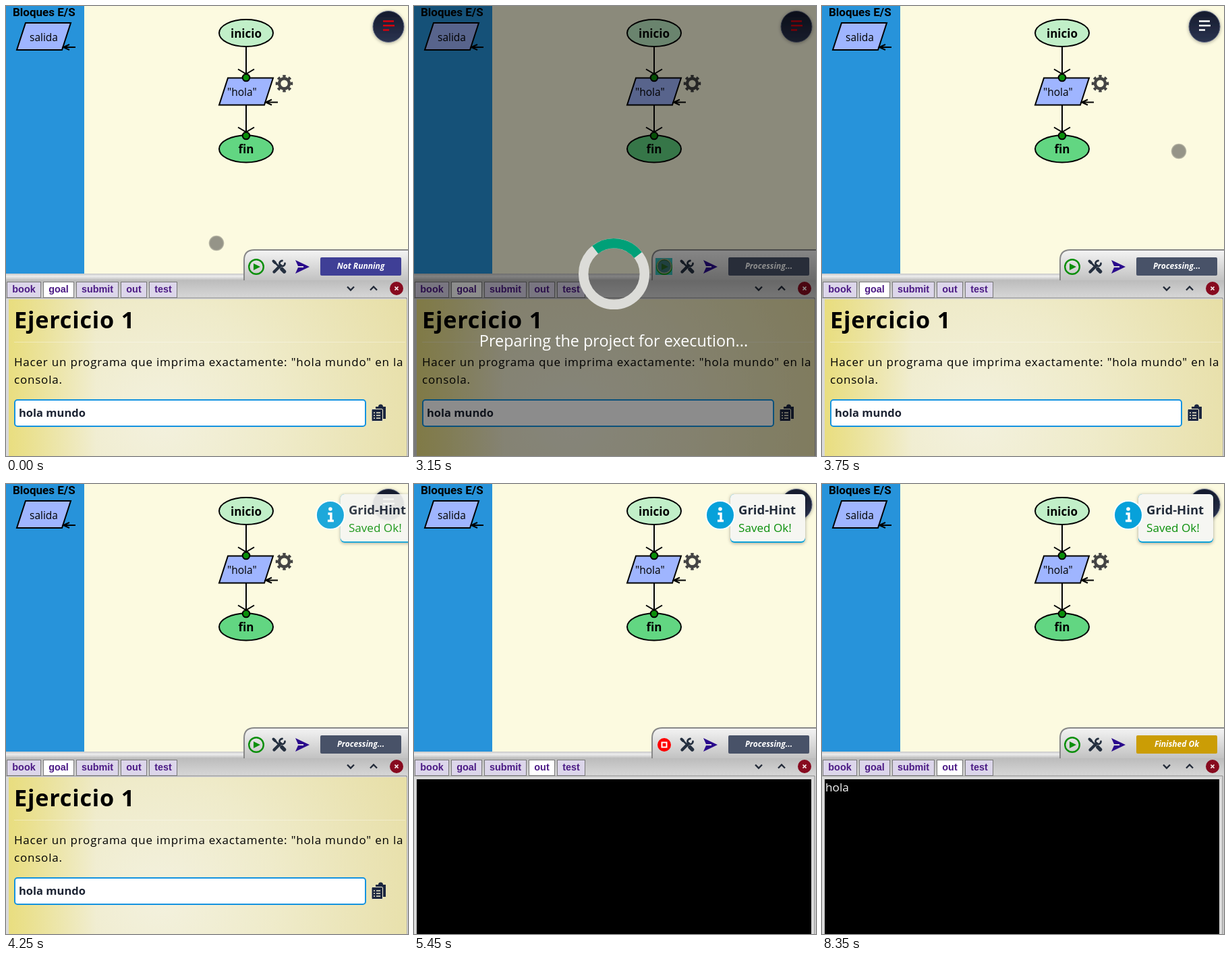
An HTML page for the animation above (9.6 s loop, 596 by 666 pixels).

```html
<!DOCTYPE html>
<html lang="es">
<head>
<meta charset="utf-8">
<style>
  html, body { margin: 0; width: 100%; height: 100%; overflow: hidden; }
  svg { display: block; width: 100vw; height: 100vh; font-family: "Open Sans", "Noto Sans", sans-serif; }
  .b { font-weight: bold; }
  .mid { text-anchor: middle; }
  .ink { fill: none; stroke: #000; stroke-width: 2; }
  .tab rect { fill: #dcd6ea; stroke: #777; }
  .tab text { font: bold 14.4px "Liberation Sans", Arial, sans-serif; fill: #4b1a85; }
  .tab.on rect { fill: #fff; }
</style>
</head>
<body>
<svg viewBox="0 0 596 666">
  <defs>
    <linearGradient id="panel" x2="0" y2="1"><stop stop-color="#f4f4f4"/><stop offset="1" stop-color="#c2c2c2"/></linearGradient>
    <linearGradient id="bar" x2="0" y2="1"><stop stop-color="#bcbcbc"/><stop offset="1" stop-color="#d8d8d8"/></linearGradient>
    <linearGradient id="split" x2="0" y2="1"><stop stop-color="#c8c8c8"/><stop offset=".4" stop-color="#eee"/><stop offset="1" stop-color="#bbb"/></linearGradient>
    <linearGradient id="navy" x2="0" y2="1"><stop stop-color="#151b2c"/><stop offset="1" stop-color="#2b3350"/></linearGradient>
    <radialGradient id="paper" gradientUnits="userSpaceOnUse" cx="230" cy="610" r="430">
      <stop stop-color="#f3f1de"/><stop offset=".4" stop-color="#efebca"/><stop offset="1" stop-color="#e6dda2"/>
    </radialGradient>
    <linearGradient id="glow"><stop stop-color="#e8dc74" stop-opacity=".85"/><stop offset="1" stop-color="#e8dc74" stop-opacity="0"/></linearGradient>
    <filter id="shade" x="-30%" y="-30%" width="160%" height="160%"><feDropShadow dx="0" dy="1" stdDeviation="2.5" flood-opacity=".35"/></filter>
    <g id="io">
      <path class="ink" style="fill:#9fb5ff" d="M13 0H80L67 40H0Z"/>
      <path class="ink" d="M87 36H70M78 32L69 36L78 40"/>
    </g>
    <g id="link">
      <path class="ink" d="M0 0V41M-12 33L0 40L12 33"/>
      <circle class="ink" cy="45.500" r="5.300" style="fill:#0a8f0a"/>
    </g>
  </defs>

  <rect width="596" height="400" fill="#fcfae0"/>
  <rect width="116" height="397" fill="#2793da"/>
  <text class="b" x="10" y="15" style="font-family:Roboto,sans-serif;font-size:17px">Bloques E/S</text>
  <use href="#io" x="16" y="25"/>
  <text x="35" y="52" font-size="15.5">salida</text>

  <ellipse class="ink" cx="356" cy="40" rx="40" ry="20" style="fill:#c1efc8"/>
  <ellipse class="ink" cx="356" cy="211.500" rx="40" ry="20" style="fill:#62d682"/>
  <use href="#io" x="316" y="106.500"/>
  <use href="#link" x="356" y="60.500"/>
  <use href="#link" x="356" y="146.500"/>
  <g class="b mid" font-size="17"><text x="356" y="46.500">inicio</text><text x="356" y="218">fin</text></g>
  <text x="328" y="133" font-size="15.5">"hola"</text>
  <g transform="translate(412.500 114.800)" fill="none" stroke="#444">
    <circle r="7.500" stroke-width="4.500"/>
    <circle r="10.800" stroke-width="4" pathLength="16" stroke-dasharray="1" transform="rotate(-11.250)"/>
  </g>

  <g filter="url(#shade)"><circle cx="567" cy="30.500" r="23" fill="url(#navy)" stroke="#5c6580"/></g>
  <path id="menu" d="M559 22.500H575M559 29H576M559 35.500H568" stroke-width="2.400"/>

  <rect y="396" width="596" height="10" fill="url(#split)"/>
  <path d="M353 406V376Q353 361 368 361H600V406" fill="url(#panel)" stroke="#888" stroke-width="2"/>
  <rect id="focus" x="358" y="373" width="25" height="25" fill="#35b5b5"/>
  <g id="play">
    <circle cx="371" cy="386" r="10.800" fill="none" stroke="#0a8f0a" stroke-width="2.400"/>
    <path d="M367 381V391L377 386Z" fill="#0a8f0a"/>
  </g>
  <g id="stop">
    <circle cx="371" cy="386" r="10" fill="red"/>
    <rect x="367.500" y="382.500" width="7" height="7" fill="none" stroke="#fff" stroke-width="2"/>
  </g>
  <g fill="none" stroke="#253040" stroke-linecap="round">
    <path d="M396.500 377.500L406 387" stroke-width="2.600"/>
    <path d="M396.500 377.500L399 380" stroke-width="4"/>
    <path d="M409 389.500L412.500 393" stroke-width="5.500"/>
    <path d="M397.500 393.500L407 384" stroke-width="4.400"/>
    <path d="M413.500 381A4 4 0 1 1 409.500 377" stroke-width="2.800"/>
  </g>
  <path d="M429 376L450 386L429 396L433 387H441V385H433Z" fill="#2a0a8c"/>
  <rect id="badge" x="466" y="372" width="120" height="27" rx="2"/>
  <text id="status" class="b mid" x="526" y="389" font-size="12" font-style="italic" fill="#fff"></text>

  <rect y="406" width="596" height="27" fill="url(#bar)"/>
  <rect y="432" width="596" height="234" fill="#d9d9d9"/>
  <path d="M0 432H594V666" fill="none" stroke="#888"/>
  <g id="tabs"></g>
  <path d="M506 415.500L511 420.500L516 415.500M540 420.500L545 415.500L550 420.500" fill="none" stroke="#222a38" stroke-width="2.300"/>
  <circle cx="579" cy="418" r="10" fill="#870a1f"/>
  <path d="M576.500 415.500L581.500 420.500M581.500 415.500L576.500 420.500" stroke="#fff" stroke-width="1.600"/>

  <g id="goal">
    <rect x="4" y="434" width="590" height="232" fill="url(#paper)"/>
    <rect x="4" y="434" width="130" height="232" fill="url(#glow)"/>
    <text class="b" x="12" y="477" font-size="34.2" letter-spacing=".8">Ejercicio 1</text>
    <path d="M12 497.500H592" stroke="#fff" opacity=".35"/>
    <g font-size="17" letter-spacing=".8">
      <text x="12" y="533">Hacer un programa que imprima exactamente: "hola mundo" en la</text>
      <text x="12" y="558.500">consola.</text>
    </g>
    <rect x="13" y="583" width="520" height="39" rx="4" fill="#fff" stroke="#1493e0" stroke-width="2"/>
    <text class="b" x="19" y="608" font-size="16.5" fill="#1d2433">hola mundo</text>
    <g fill="#1d2740">
      <path d="M548 593H552A3.500 3.500 0 0 1 559 593H563V611H548Z"/>
      <rect x="542" y="596.500" width="16.500" height="18" rx="1.500" stroke="#f1edcf"/>
      <path d="M545 602H547M549 602H555M545 606H547M549 606H555M545 610H547M549 610H555" stroke="#f1edcf" stroke-width="1.500"/>
    </g>
  </g>
  <g id="out">
    <rect x="4" y="437" width="585" height="229"/>
    <text id="print" x="5" y="454.500" font-size="17.200" fill="#f4f4f4">hola</text>
  </g>

  <g id="toast">
    <g filter="url(#shade)">
      <rect x="469" y="15" width="111" height="72" rx="6" fill="#0aa2d8"/>
      <rect x="469" y="15" width="111" height="70" rx="6" fill="#f6f6f2"/>
    </g>
    <circle cx="454" cy="46" r="21" fill="#07a1da" stroke="#fff" stroke-width="2"/>
    <circle cx="454" cy="37" r="2.800" fill="#fff"/>
    <path d="M450.500 44H455V54M450 54.500H459" fill="none" stroke="#fff" stroke-width="3.500"/>
    <text class="b" x="481" y="45" font-size="18.500" fill="#222b3a">Grid-Hint</text>
    <text x="481" y="70.500" font-size="17.100" fill="#0a8f0a">Saved Ok!</text>
  </g>

  <circle id="cursor" r="10.500" stroke="#a9a899" stroke-opacity=".8" stroke-width="1.600" fill="#404040"/>

  <g id="wait">
    <rect width="596" height="666" opacity=".45"/>
    <g fill="none" stroke-width="14.500">
      <circle cx="296.500" cy="396.500" r="45.300" stroke="#dcdcd8"/>
      <path id="arc" d="M264.500 364.500A45.300 45.300 0 0 1 328.500 364.500" stroke="#00a078"/>
    </g>
    <text class="mid" x="296" y="504" font-size="23.400" fill="#fff">Preparing the project for execution...</text>
  </g>
</svg>
<script>
const LOOP = 9600, STEP = 50;
const $ = id => document.getElementById(id);
const show = (id, on) => $(id).style.display = on ? '' : 'none';
const set = (id, attrs) => { for (const k in attrs) $(id).setAttribute(k, attrs[k]); };

const tabs = [['book', 1, 51], ['goal', 55, 46], ['submit', 104, 63], ['out', 170, 39], ['test', 212, 42]];
$('tabs').innerHTML = tabs.map(([name, x, w]) =>
  `<g class="tab" data-name="${name}"><rect x="${x + .5}" y="408.5" width="${w - 1}" height="23"/>` +
  `<text class="mid" x="${x + w / 2}" y="424">${name}</text></g>`).join('');

// Eased progress on cubic-bezier(.25, .8, .25, 1)
function ease(x) {
  let lo = 0, hi = 1, s;
  for (let i = 0; i < 20; i++) {
    s = (lo + hi) / 2;
    if (.75 * s * (1 - s) + s ** 3 < x) lo = s; else hi = s;
  }
  return 2.4 * s * (1 - s) ** 2 + 3 * s * s * (1 - s) + s ** 3;
}

// Pointer stops: time, x, y
const path = [[100, 312, 351], [900, 369, 383], [1100, 369, 383], [1250, 371, 385], [3400, 371, 385], [3750, 529, 215], [3950, 612, 126]];
function pointer(t) {
  const i = path.findIndex(p => p[0] > t);
  if (i < 1) return (i ? path[path.length - 1] : path[0]).slice(1);
  const [a, b] = [path[i - 1], path[i]];
  let k = (t - a[0]) / (b[0] - a[0]);
  if (t < 900) k = k * k * (3 - 2 * k);
  return [a[1] + (b[1] - a[1]) * k, a[2] + (b[2] - a[2]) * k];
}

function draw(t) {
  const loading = t >= 3150 && t < 3600;
  const running = t >= 5200 && t < 8350;
  const tab = t < 5200 ? 'goal' : 'out';
  const [label, color] = t < 3150 ? ['Not Running', '#3f3f96']
    : t < 8350 ? ['Processing...', '#485268'] : ['Finished Ok', '#cb9d05'];

  set('menu', { stroke: t < 3600 ? '#d8000c' : '#fff' });
  set('badge', { fill: color });
  $('status').textContent = label;
  show('play', !running);
  show('stop', running);
  show('focus', loading);
  show('goal', tab === 'goal');
  show('out', tab === 'out');
  show('print', t >= 8300);
  for (const g of $('tabs').children) g.classList.toggle('on', g.dataset.name === tab);

  const [x, y] = pointer(t);
  set('cursor', { cx: x, cy: y, 'fill-opacity': t >= 1800 && t < 3150 ? .6 : .55 });
  show('cursor', t < 3950);

  show('wait', loading);
  set('arc', { transform: `rotate(${7 + (t - 3150) * .36} 296.5 396.5)` });

  const k = ease(Math.min(1, Math.max(0, (t - 3870) / 850)));
  show('toast', t >= 3870);
  set('toast', { transform: `translate(${300 * (1 - k)} 0)`, opacity: k });
}

function tick() {
  draw(Math.floor(performance.now() % LOOP / STEP) * STEP);
  requestAnimationFrame(tick);
}
tick();
</script>
</body>
</html>
```
